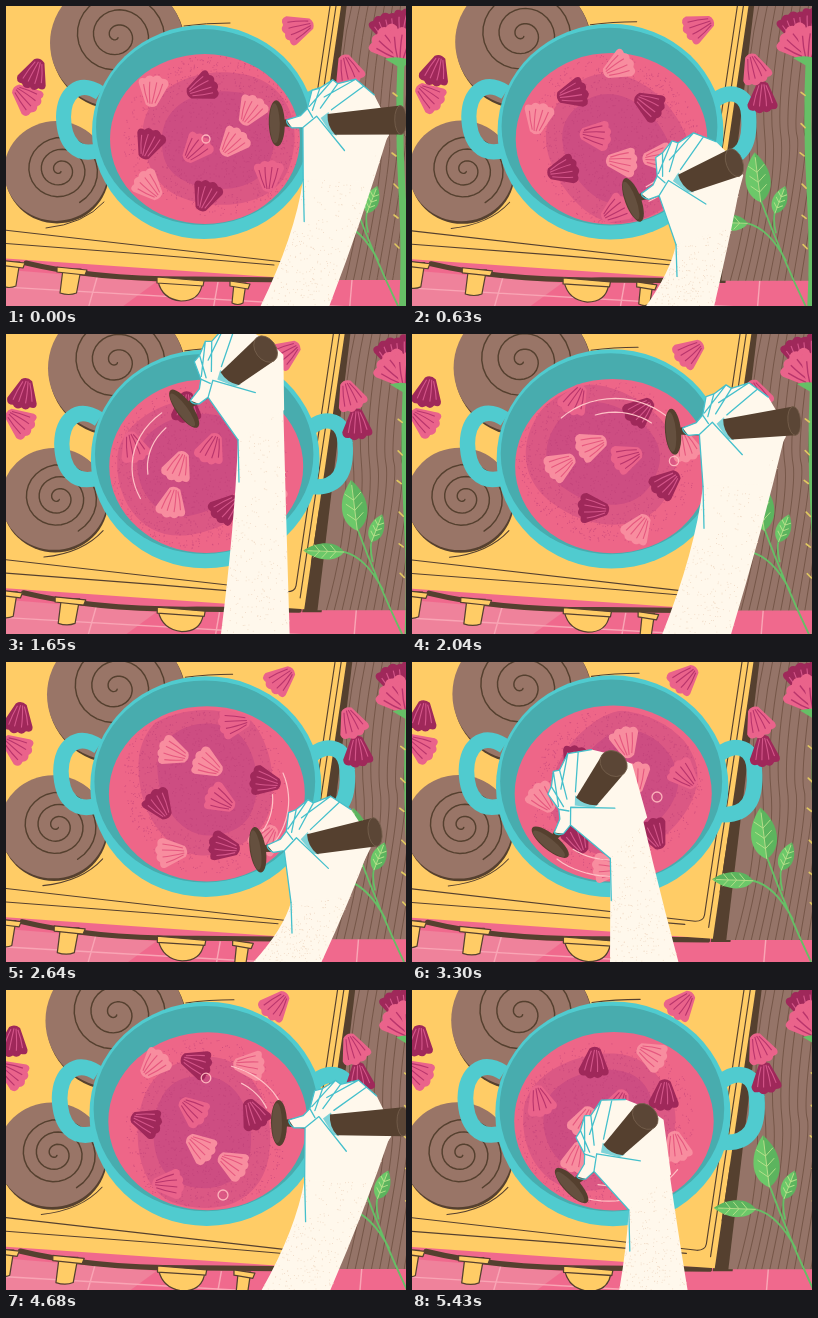
These frames come from a looping animation (400 by 300 pixels, 5.46 s). An HTML page:

```html
<!DOCTYPE html>
<html lang="en">
<head>
<meta charset="utf-8">
<title>Stirring rose petals</title>
<style>
html, body { margin: 0; width: 100%; height: 100%; overflow: hidden; background: #ffcc66; }
svg { display: block; width: 100%; height: 100%; }
.line { fill: none; stroke: #55402f; stroke-linecap: round; stroke-linejoin: round; }
.cyan { fill: none; stroke: #45c0cc; stroke-width: 1.3; stroke-linecap: round; stroke-linejoin: round; }
</style>
</head>
<body>
<svg viewBox="0 0 400 300" preserveAspectRatio="none">
  <defs>
    <clipPath id="plank"><path d="M343,-20H430V274H303Z"/></clipPath>
    <clipPath id="soup"><ellipse cx="199" cy="133" rx="95" ry="85"/></clipPath>
    <path id="petalShape" d="M-5,-14Q0,-18 6,-14L15,7Q16,13 9,12Q6,17 1,14Q-4,18-8,13Q-15,14-15,7Z"/>
    <path id="petalVeins" d="M-3,-12Q-7,-2-9,8M0,-13Q-2,0-3,9M2,-13Q4,0 4,9M4,-12Q8,-3 10,6"/>
  </defs>
  <g id="camera">
    <rect x="-20" y="240" width="450" height="80" fill="#f0698d"/>
    <path d="M-20,262L150,276L90,320H-20Z" fill="#ef829b"/>
    <path d="M-20,280L430,306M92,268L80,310M212,276L206,310M346,274L343,310" fill="none" stroke="#f9a5b5" stroke-width="1.4"/>

    <path d="M335,-20H352L312,276H293Z" fill="#55402f"/>
    <path d="M343,-20H430V274H308Z" fill="#957468"/>
    <g id="grain" clip-path="url(#plank)" fill="none" stroke="#765749" stroke-width="1"></g>

    <path d="M20,257Q90,274 190,273L290,274" class="line" stroke-width="5"/>
    <path d="M-20,-20H338L295,273L-20,251Z" fill="#ffcc66"/>
    <path d="M327,-20L287,250Q286,256 278,256L-20,222M333,-20L291,262M-20,236L150,249L268,259" class="line" stroke-width="1.1"/>
    <path d="M178,20Q200,17 224,17M310,175L302,228" class="line" stroke-width="1"/>
    <g id="knobs" fill="#ffcc66" stroke="#55402f" stroke-width="1.2" stroke-linejoin="round"></g>
    <g id="burners"></g>

    <g fill="none" stroke="#66bf66" stroke-linecap="round">
      <path d="M395,56Q392,120 396,185T396,310" stroke-width="7"/>
      <path d="M392,300Q368,250 347,194M372,254Q355,222 334,217M362,226Q359,214 361,206" stroke-width="1.8"/>
      <path d="M391,90l-4,-3M391,122l-4,-4M390,150l-4,-3M392,182l-4,-4M392,212l-4,-3M393,242l-4,-4" stroke="#e0c860" stroke-width="1.6"/>
    </g>
    <g id="leaves" stroke-width=".9"></g>
    <g id="rose"></g>
    <path d="M379,53Q390,49 404,54L396,63Z" fill="#66bf66"/>

    <g fill="none" stroke="#50cbcf" stroke-width="15">
      <path d="M94,87C72,73 58,88 57.500,111C58,136 70,152 94,144"/>
      <path d="M300,96C318,82 334,89 335,110C337,137 330,156 300,153"/>
    </g>
    <ellipse cx="198" cy="126" rx="112" ry="107" fill="#50cbcf"/>
    <ellipse cx="197" cy="121" rx="107" ry="98" fill="#48acae"/>
    <ellipse cx="199" cy="133" rx="95" ry="85" fill="#ee6688"/>
  </g>
  <g clip-path="url(#soup)">
    <g id="swirl">
      <path d="M-62,8C-72,-38-20,-72 36,-62C86,-54 98,-4 82,34C66,74 0,76-32,58C-52,46-58,30-62,8Z" fill="#db5884"/>
      <path d="M-44,6C-46,-34 0,-52 40,-42C72,-30 76,14 56,38C36,60-12,56-32,38C-42,28-44,18-44,6Z" fill="#cd4d82"/>
      <path id="speckles" stroke="#bd3f78" stroke-width="1" opacity=".6"/>
    </g>
  </g>
  <g id="petals"></g>
  <g id="bubbles" fill="none" stroke="#ffb7bd" stroke-width="1.3"></g>
  <path id="trail" fill="none" stroke="#ffc2c6" stroke-width="1.2" stroke-linecap="round"/>
  <path id="arm" fill="#fff8ec"/>
  <path id="armDots" stroke="#f1dcc8" stroke-width="1"/>
  <g id="hand">
    <path d="M4,-3L26,-6V6L4,3Z" fill="#55402f"/>
    <ellipse rx="8" ry="23" fill="#55402f"/>
    <ellipse cx="-2" rx="5" ry="20" fill="#65503f"/>
    <path d="M10,-3L24,-7L31,-14L36,-32L44,-34L57,-42L62,-38L80,-42L98,-26L108,-5L112,15L80,60L25,57L26,5L15,5Z" fill="#fff8ec"/>
    <path d="M44,-4L52,-10L60,14L54,12Z" fill="#7fd3d8"/>
    <path class="cyan" d="M25,57L26,5L15,5Q9,1 10,-3L24,-7L31,-14L36,-32L44,-34L57,-42L62,-38L80,-42L98,-26M31,-14L36,-5M44,-34L36,-12M57,-42L33,-16M80,-42L48,-25M62,-38L44,-14M88,-35L55,-12M26,5L40,-6L67,29"/>
    <path id="handle" fill="#55402f"/>
    <ellipse id="cap" ry="14.500" fill="#5b4636" stroke="#77614e" stroke-width=".8"/>
  </g>
  <path id="armEdge" class="cyan"/>
</svg>
<script>
const LOOP = 5460, RAD = Math.PI / 180;
const $ = id => document.getElementById(id);

function add(parent, tag, attrs) {
  const node = document.createElementNS("http://www.w3.org/2000/svg", tag);
  for (const name in attrs) node.setAttribute(name, attrs[name]);
  parent.appendChild(node);
  return node;
}
function set(id, attrs) {
  for (const name in attrs) $(id).setAttribute(name, attrs[name]);
}
let seed = 7;
const random = () => (seed = seed * 16807 % 2147483647) / 2147483647;
const clamp = (v, lo, hi) => Math.min(hi, Math.max(lo, v));
const mix = (a, b, u) => a + (b - a) * u;
const xy = p => p[0].toFixed(1) + "," + p[1].toFixed(1);

// Stirring: time, angle in degrees, reach
const stir = [
  [0, -14.5, 1], [1260, 171, 1], [2040, 326, 1], [3300, 501, 1.19],
  [4050, 630, .87], [4680, 720, 1], [5430, 842, 1.17]
];

// Smooth Hermite interpolation through the stirring keys
function sample(t, column) {
  let i = 0;
  while (i < stir.length - 2 && t >= stir[i + 1][0]) i++;
  const slope = k => {
    const a = stir[Math.max(0, k - 1)], b = stir[Math.min(stir.length - 1, k + 1)];
    return (b[column] - a[column]) / (b[0] - a[0]);
  };
  const a = stir[i], b = stir[i + 1], span = b[0] - a[0];
  const u = (t - a[0]) / span, v = 1 - u;
  return a[column] * v * v * (1 + 2 * u) + b[column] * u * u * (3 - 2 * u)
    + span * u * v * (slope(i) * v - slope(i + 1) * u);
}
function stirPoint(t, scale = 1) {
  const angle = sample(t, 1) * RAD, reach = sample(t, 2) * scale;
  return [203 + 70 * reach * Math.cos(angle), 133 + 63 * reach * Math.sin(angle)];
}

// Scenery
function addBurner(cx, cy, r, dx, dy) {
  add($("burners"), "ellipse", { cx: cx + 1, cy: cy + 2, rx: r, ry: r * .97, fill: "#55402f" });
  add($("burners"), "ellipse", { cx, cy, rx: r, ry: r * .96, fill: "#997567" });
  let d = "";
  for (let a = 0; a <= 1080; a += 12) {
    const rad = 2 + a / 1080 * r * .72, turn = (a + 60) * RAD;
    d += (a ? "L" : "M") + xy([cx + dx + rad * Math.cos(turn), cy + dy + rad * .95 * Math.sin(turn)]);
  }
  add($("burners"), "path", { d, class: "line", "stroke-width": 1.4 });
}
addBurner(111, 37, 67, 0, -7);
addBurner(50, 165, 52, 4, -1);
add($("burners"), "path", { d: "M40,222Q78,218 98,196", class: "line", "stroke-width": 1 });

function addKnob(x, y, w, h) {
  add($("knobs"), "path", { d: `M${x - w * .6},${y}L${x - w * .8},${y + h}Q${x - w * .2},${y + h + 3} ${x + w * .3},${y + h}L${x + w * .6},${y}Z` });
  add($("knobs"), "path", { d: `M${x - w},${y - 2}L${x + w},${y + 1}L${x + w - 2},${y + 6}L${x - w},${y + 3}Z` });
}
addKnob(6, 256, 13, 24);
addKnob(66, 263, 15, 24);
addKnob(234, 277, 10, 20);
add($("knobs"), "path", { d: "M152,275L196,279Q193,295 175,295Q156,293 152,275Z" });
add($("knobs"), "path", { d: "M151,271L198,275L197,280L151,277Z" });

for (let i = 0; i < 13; i++) {
  const x = 348 + i * 8;
  add($("grain"), "path", { d: `M${x},-10Q${x - 18},${60 + i * 9} ${x - 13},130T${x - 36},290` });
}

[[347, 196, -7, 50, .3], [361, 207, 21, 29, .3], [334, 217, -88, 40, .24]].forEach(([x, y, turn, len, fat]) => {
  const leaf = add($("leaves"), "g", { transform: `translate(${x} ${y}) rotate(${turn})`, stroke: "#b5e08a" });
  const side = s => `M0,0C${s * len * fat},${-len * .15} ${s * len * fat * 1.2},${-len * .6} 0,${-len}Z`;
  add(leaf, "path", { d: side(-1), fill: "#6cc869", stroke: "none" });
  add(leaf, "path", { d: side(1), fill: "#5cb45e", stroke: "none" });
  let veins = `M0,0V${-len * .9}`;
  for (const k of [.2, .4, .6])
    veins += `M${-len * .16},${-len * (k + .14)}L0,${-len * k}L${len * .16},${-len * (k + .14)}`;
  add(leaf, "path", { d: veins, fill: "none" });
});

// Petals
const tints = {
  dark: ["#9f285a", "#d4568a"],
  mid: ["#ea638b", "#b8356c"],
  light: ["#f88d9f", "#e5587f"]
};
function addPetal(parent, tint) {
  const [fill, stroke] = tints[tint];
  const node = add($(parent), "g", {});
  add(node, "use", { href: "#petalShape", fill });
  add(node, "use", { href: "#petalVeins", fill: "none", stroke, "stroke-width": 1.1 });
  return node;
}
function petal(x, y, turn, tint, driftX = 0, driftY = 0) {
  return { node: addPetal("petals", tint), x, y, turn, driftX, driftY };
}
addPetal("rose", "dark").setAttribute("transform", "translate(380 23) rotate(160) scale(1)");
addPetal("rose", "dark").setAttribute("transform", "translate(402 20) rotate(195) scale(1.1)");
addPetal("rose", "mid").setAttribute("transform", "translate(384 39) rotate(135) scale(1.2)");
addPetal("rose", "mid").setAttribute("transform", "translate(399 40) rotate(190) scale(1.2)");

const floating = [
  petal(147, 85, -175, "light"), petal(196, 82, -115, "dark"),
  petal(245, 105, -150, "light"), petal(143, 138, -160, "dark"),
  petal(190, 143, -140, "mid"), petal(227, 137, -140, "light"),
  petal(263, 170, -180, "mid"), petal(143, 180, -225, "light"),
  petal(200, 190, -160, "dark")
];
const resting = [
  petal(20, 92, -50, "mid", -8, -5), petal(28, 68, 20, "dark", -16, -12),
  petal(292, 22, 70, "mid", -30), petal(350, 92, 0, "dark", -7),
  petal(342, 64, -20, "mid", -4)
];
const bubbles = [[0, 200, 133], [1900, 262, 127], [3080, 245, 135], [3850, 140, 97], [4500, 200, 88], [4460, 217, 205]]
  .map(([start, x, y]) => ({ start, node: add($("bubbles"), "circle", { cx: x, cy: y }) }));

let dots = "";
for (let i = 0; i < 1100; i++) {
  const a = random() * 2 * Math.PI, r = 92 * Math.sqrt(random());
  dots += `M${xy([8 + r * Math.cos(a), r * .88 * Math.sin(a)])}h.9`;
}
set("speckles", { d: dots });
const armDots = Array.from({ length: 260 }, () => [random() ** .7, random()]);

function drawArm(x, y, tilt) {
  const c = Math.cos(tilt * RAD), s = Math.sin(tilt * RAD);
  const place = (px, py) => [x + px * c - py * s, y + px * s + py * c];
  const left = place(25, 57), right = place(111, 14);
  const bottom = 197 + (x - 136) * .42;
  const endLeft = [bottom, 302], endRight = [bottom + 69, 302];
  const bendLeft = [mix(left[0], bottom, .2), mix(left[1], 302, .45)];
  const bendRight = [mix(right[0], endRight[0], .42), mix(right[1], 302, .48)];
  const curve = (a, b, e, u) => [0, 1].map(k => mix(mix(a[k], b[k], u), mix(b[k], e[k], u), u));
  set("arm", { d: `M${xy(left)}Q${xy(bendLeft)} ${xy(endLeft)}L${xy(endRight)}Q${xy(bendRight)} ${xy(right)}Z` });
  set("armEdge", { d: `M${xy(left)}l1,${Math.min(42, (302 - left[1]) * .5).toFixed(1)}` });
  set("armDots", {
    d: armDots.map(([u, v]) => {
      const a = curve(left, bendLeft, endLeft, u), b = curve(right, bendRight, endRight, u);
      return `M${xy([mix(a[0], b[0], v), mix(a[1], b[1], v)])}h.9`;
    }).join("")
  });
}

function drawTrail(t) {
  const arc = (scale, from, to) => {
    let d = "";
    for (let back = from; back >= to; back -= 30)
      d += (d ? "L" : "M") + xy(stirPoint(Math.max(0, t - back), scale));
    return d;
  };
  set("trail", { d: t < 120 ? "" : arc(1.1, 500, 80) + arc(.88, 380, 110) });
}

function render(t) {
  const p = t / LOOP, eased = 1 - (1 - p) ** 1.5, drift = 1 - (1 - p) ** 2;
  const zoom = 1 + .05 * eased;
  const cameraX = x => 140 + (x - 140) * zoom, cameraY = y => 170 + (y - 170) * zoom;
  const view = `translate(140 170) scale(${zoom}) translate(-140 -170)`;
  set("camera", { transform: view });

  const spin = .61 * (sample(t, 1) + 14.5), c = Math.cos(spin * RAD), s = Math.sin(spin * RAD);
  set("swirl", { transform: `translate(200 130) rotate(${spin})` });
  for (const f of floating) {
    const dx = f.x - 200, dy = f.y - 130;
    f.node.setAttribute("transform", `translate(${200 + dx * c - dy * s} ${130 + dx * s + dy * c}) rotate(${f.turn + spin})`);
  }
  for (const r of resting)
    r.node.setAttribute("transform", `translate(${cameraX(r.x) + r.driftX * drift} ${cameraY(r.y) + r.driftY * drift}) rotate(${r.turn + r.driftX * drift})`);
  for (const b of bubbles) {
    const age = (t - b.start) / 450, alive = age >= 0 && age < 1;
    b.node.setAttribute("r", alive ? 4 + 2 * age : 0);
    b.node.setAttribute("opacity", alive ? 1 - age ** 4 : 0);
  }

  const [x, y] = stirPoint(t);
  const tilt = -52 + (x - 136) * .375;
  const length = 106 + clamp((x - 200) * .34, 0, 23);
  const facing = clamp((270 - x) / 130, 0, 1);
  drawTrail(t);
  drawArm(x, y, tilt);
  set("hand", { transform: `translate(${x} ${y}) rotate(${tilt})` });
  set("handle", { d: `M51,-8L${length - 5},-14.500V14.500L58,13Q50,4 51,-8Z` });
  set("cap", { cx: length - 5, rx: 6 + 6 * facing });
}

// Three short pictures, then one held twice as long
function frame() {
  let step = Math.floor(performance.now() % LOOP / 30);
  if (step % 5 === 4) step--;
  render(step * 30);
  requestAnimationFrame(frame);
}
frame();
</script>
</body>
</html>
```
